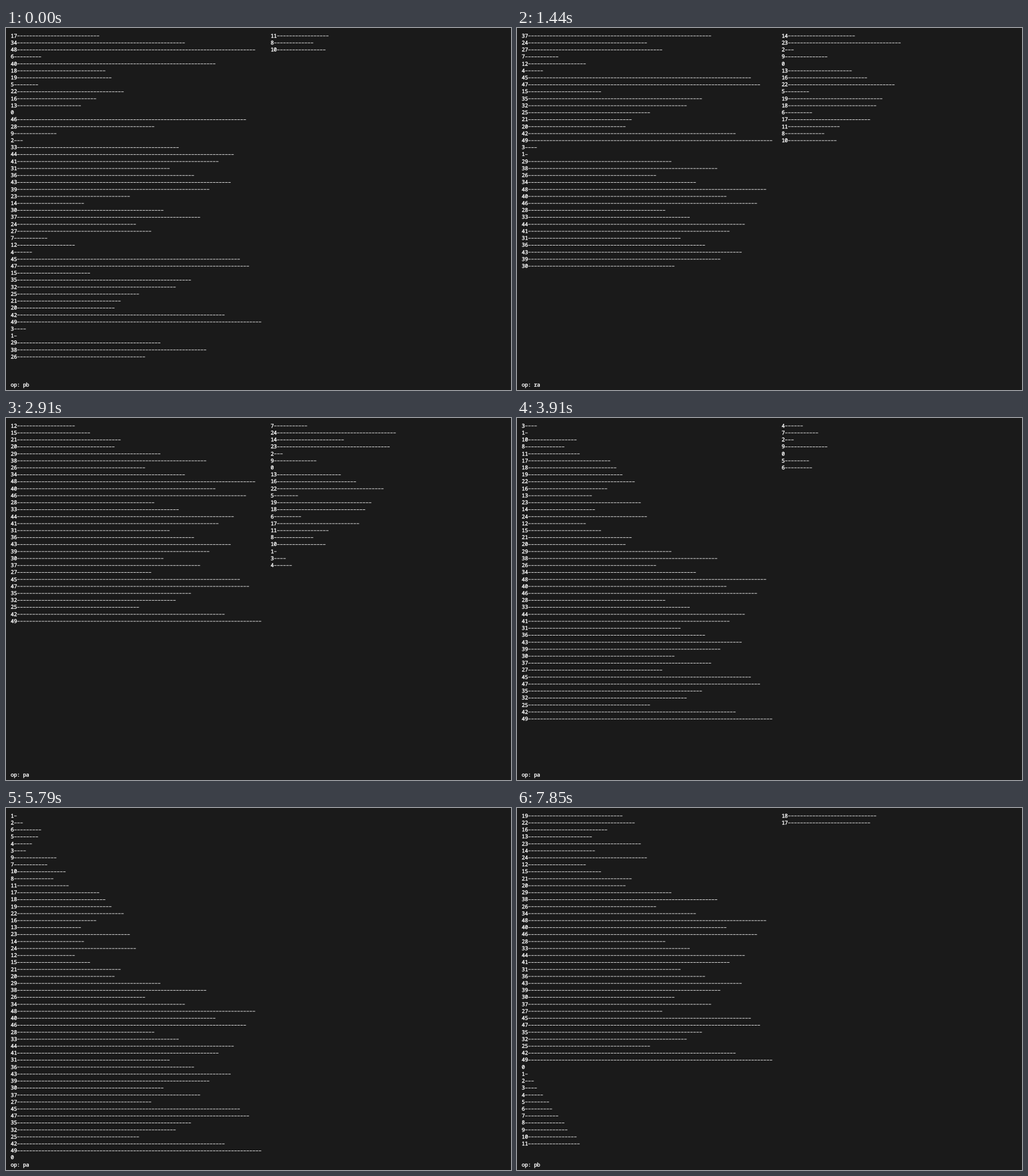
These frames come from a looping animation (883x634 px, 8 s). An HTML page with a canvas:

```html
<!DOCTYPE html>
<html lang="en">
<head>
<meta charset="utf-8">
<title>Two-stack sort</title>
<style>
  html, body { margin: 0; width: 100%; height: 100%; overflow: hidden; background: #1a1a1a; }
  canvas { display: block; width: 883px; height: 634px; }
</style>
</head>
<body>
<canvas id="stage"></canvas>
<script>
const W = 883, H = 634, LOOP = 8000;
const LINE = 12.22, CELL = LINE * 7 / 16, LEFT = 8.45, BASE = 16.7;
const OP_MS = 55.2, OP_COUNT = 150;

// ---- The sort: quicksort with two stacks, logging every operation ----
const a = [17, 34, 48, 6, 40, 18, 19, 5, 22, 16, 13, 0, 46, 28, 9, 2, 33, 44, 41, 31,
  36, 43, 39, 23, 14, 30, 37, 24, 27, 7, 12, 4, 45, 47, 15, 35, 32, 25, 21, 20,
  42, 49, 3, 1, 29, 38, 26];
const b = [11, 8, 10];
const log = [];

const moves = {
  pa: () => a.unshift(b.shift()),
  pb: () => b.unshift(a.shift()),
  ra: () => a.push(a.shift()),
  rb: () => b.push(b.shift()),
  rra: () => a.unshift(a.pop())
};

function save(op) {
  log.push({ a: [...a], b: [...b], op });
}

function run(op) {
  moves[op]();
  save(op);
}

// Move every value of [low, high] to b; returns how often a was rotated.
function splitA(low, high) {
  const inside = v => v >= low && v <= high;
  let turns = 0;
  while (a.some(inside)) {
    if (inside(a[0])) run('pb');
    else { run('ra'); turns++; }
  }
  return turns;
}

// Give the upper half back to a, then the rest; returns the median.
function emptyB() {
  const mid = [...b].sort((x, y) => x - y)[b.length >> 1];
  while (b.some(v => v >= mid)) run(b[0] >= mid ? 'pa' : 'rb');
  while (b.length) run('pa');
  return mid;
}

function sort() {
  save('pb');
  splitA(0, 24);
  const limits = [25, emptyB()];
  let next = 0;
  while (log.length < OP_COUNT) {
    if (a[0] === next) {
      run('ra');
      next++;
      continue;
    }
    while (limits.at(-1) <= next) limits.pop();
    const mid = Math.ceil((next + limits.at(-1)) / 2);
    let turns = splitA(next, mid);
    while (turns-- > 0) run('rra');
    limits.push(mid + 1, emptyB());
  }
}

// ---- Screen refreshes: even steps between a few [step, time] points ----
const pace = [[0, 0], [1, 80], [5, 880], [13, 2000], [27, 3910], [40, 5790], [48, 6860], [54, 7850]];

function refreshTime(t) {
  let k = pace.length - 1;
  while (pace[k][0] && pace[k][1] > t) k--;
  if (k === pace.length - 1) return pace[k][1];
  const [s0, t0] = pace[k], [s1, t1] = pace[k + 1];
  const step = (t1 - t0) / (s1 - s0);
  return t0 + Math.floor((t - t0) / step) * step;
}

// ---- Drawing ----
const canvas = document.getElementById('stage');
const ctx = canvas.getContext('2d');
const dpr = window.devicePixelRatio || 1;
canvas.width = Math.round(W * dpr);
canvas.height = Math.round(H * dpr);
ctx.scale(dpr, dpr);

function text(str, x, y) {
  ctx.lineWidth = 0.4;
  ctx.strokeStyle = '#fff';
  ctx.setLineDash([]);
  [...str].forEach((ch, i) => {
    const mid = x + (i + 0.5) * CELL;
    ctx.fillText(ch, mid, y);
    ctx.strokeText(ch, mid, y);
  });
}

function dashes(count, x, y) {
  ctx.lineWidth = 1;
  ctx.strokeStyle = '#e2e2e2';
  ctx.setLineDash([CELL - 1, 1]);
  ctx.beginPath();
  ctx.moveTo(x + 0.5, y);
  ctx.lineTo(x + count * CELL - 0.5, y);
  ctx.stroke();
}

function column(stack, x) {
  stack.forEach((v, row) => {
    const label = String(v), y = BASE + row * LINE;
    const count = Math.floor(v * 80 / 49);
    text(label, x, y);
    if (count) dashes(count, x + label.length * CELL, y - 2.8);
  });
}

function draw({ a, b, op }) {
  ctx.fillStyle = '#1a1a1a';
  ctx.fillRect(0, 0, W, H);
  ctx.fillStyle = '#fff';
  ctx.font = '9.3px "Noto Sans Mono", "DejaVu Sans Mono", monospace';
  ctx.textAlign = 'center';
  ctx.textRendering = 'geometricPrecision';
  column(a, LEFT);
  column(b, LEFT + 85 * CELL);
  text('op: ' + op, LEFT, BASE + 50 * LINE);
}

sort();
const start = performance.now();
let shown = -1;

function frame() {
  const t = (performance.now() - start) % LOOP;
  const index = Math.round(refreshTime(t + 0.5) / OP_MS);
  if (index !== shown) {
    shown = index;
    draw(log[index]);
  }
  requestAnimationFrame(frame);
}
frame();
</script>
</body>
</html>
```
